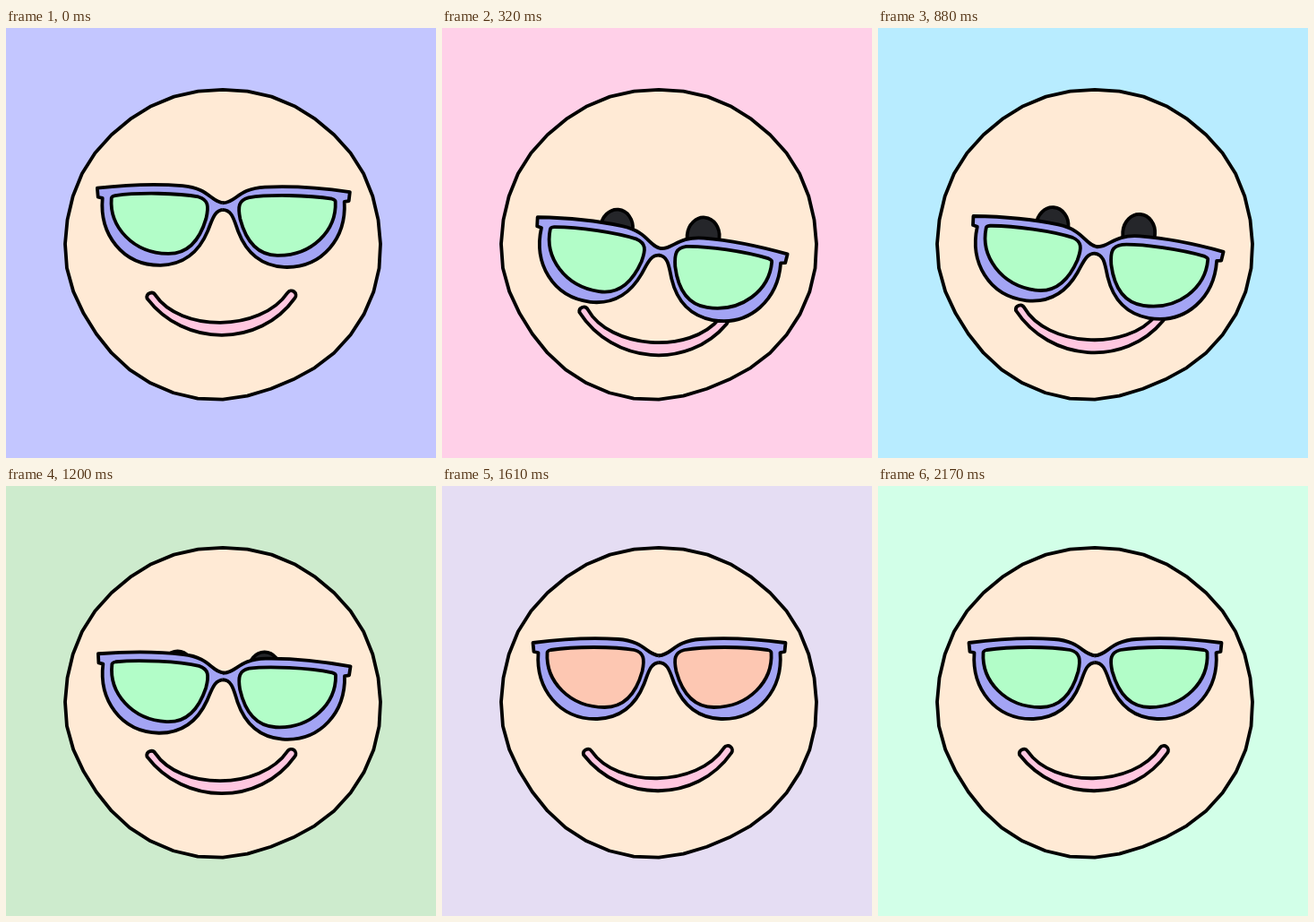
An HTML page with a canvas for the animation above (2250 ms loop, 480x480 px).

```html
<!DOCTYPE html>
<html lang="en">
<head>
<meta charset="utf-8">
<title>Smiley with sliding sunglasses</title>
<style>
  html, body { margin: 0; width: 100%; height: 100%; overflow: hidden; }
  canvas { display: block; width: 480px; height: 480px; }
</style>
</head>
<body>
<canvas id="stage" width="480" height="480"></canvas>
<script>
const ctx = document.getElementById("stage").getContext("2d");
const LOOP = 2250, STEP = 80;

// Half of the glasses, left of a centre line at x = 0; the other half is its mirror image.
const halfFrame = new Path2D(`M1 189.5 C-14 189 -16 173 -46 171 C-75 169 -110 171 -141 175
  L-140 185 L-135 186 C-138 226 -112 261 -69 260 C-45 259 -27 246 -17 221 C-12 208 -10 197 1 197`);
const lens = new Path2D(`M-125 186 Q-125 184 -121 183 C-95 179 -50 179 -28 183 C-17 186 -16 193 -19 207
  C-26 232 -40 247 -61 247 C-100 247 -127 218 -125 186Z`);
const mouth = new Path2D(`M167 296 C195 337 285 337 315 292 A5 5 0 0 1 323 298
  C284 354 200 354 158 300 A5 5 0 0 1 167 296Z`);
const head = makeHead();

const backdrops = [
  [0, 195, 198, 255], [320, 255, 208, 232], [880, 184, 236, 255],
  [1200, 205, 235, 205], [1610, 229, 221, 243], [1930, 210, 255, 232]
];

const clamp = x => Math.min(1, Math.max(0, x));
const smooth = x => (x = clamp(x)) * x * (3 - 2 * x);

// A hand-cut circle whose lower edge bulges a little.
function makeHead() {
  const path = new Path2D(), sides = 40;
  for (let i = 0; i < sides; i++) {
    const a = i / sides * 2 * Math.PI;
    const r = 1 + 0.016 * Math.max(0, Math.sin(a)) * Math.cos(4 * a - 7.54) + 0.002 * Math.sin(9 * a);
    path.lineTo(242 + 176 * r * Math.cos(a), 241 + 172.5 * r * Math.sin(a));
  }
  path.closePath();
  return path;
}

// The drawing advances in steps and rests after sliding down and after coming back up.
function stepTime(t) {
  if (t >= 1530) return 1530 + Math.floor((t - 1530) / STEP) * STEP;
  const s = Math.min(1280, Math.floor(t / STEP) * STEP);
  return s === 720 ? 640 : s;
}

function backdropAt(t) {
  const i = backdrops.findIndex(k => k[0] > t);
  if (i < 0) return backdrops.at(-1).slice(1);
  const a = backdrops[i - 1], b = backdrops[i], u = (t - a[0]) / (b[0] - a[0]);
  return a.map((v, n) => v + (b[n] - v) * u).slice(1);
}

function lensHue(t) {
  return t < 1530 ? 138 : 312 * ((2170 - t) / 640) ** 2 - 222;
}

function paint(path, fill) {
  ctx.fillStyle = fill;
  ctx.fill(path);
  ctx.stroke(path);
}

function eye(x) {
  const path = new Path2D();
  path.ellipse(x, 203, 18, 21, 0, 0, 2 * Math.PI);
  paint(path, "#25262a");
}

function posed(x, y, drop, degrees, draw) {
  ctx.save();
  ctx.translate(x, y + drop);
  ctx.rotate(degrees * Math.PI / 180);
  ctx.translate(-x, -y);
  draw();
  ctx.restore();
}

function glasses(color) {
  for (const side of [1, -1]) {
    ctx.save();
    ctx.translate(242.5, 0);
    ctx.scale(side, 1);
    paint(halfFrame, "#a3a4f4");
    paint(lens, color);
    ctx.restore();
  }
}

function render(now) {
  const t = stepTime(now % LOOP);
  const down = smooth((t + STEP) / 400);
  const face = down - smooth((t - 760) / 560);
  const slide = down - clamp((t - 720) / 560) ** 2.7;

  ctx.fillStyle = `rgb(${backdropAt(t)})`;
  ctx.fillRect(0, 0, 480, 480);
  ctx.strokeStyle = "#000";
  ctx.lineWidth = 3.8;
  ctx.lineJoin = "round";
  paint(head, "#ffead5");
  posed(241, 245, 25 * face, 5.2 * face, () => {
    eye(191);
    eye(288);
    paint(mouth, "#ffc7e0");
  });
  posed(242, 200, 56.5 * slide, 8.4 * slide, () => glasses(`hsl(${lensHue(t)}, 95%, 84.5%)`));
  requestAnimationFrame(() => render(performance.now()));
}
render(0);
</script>
</body>
</html>
```
